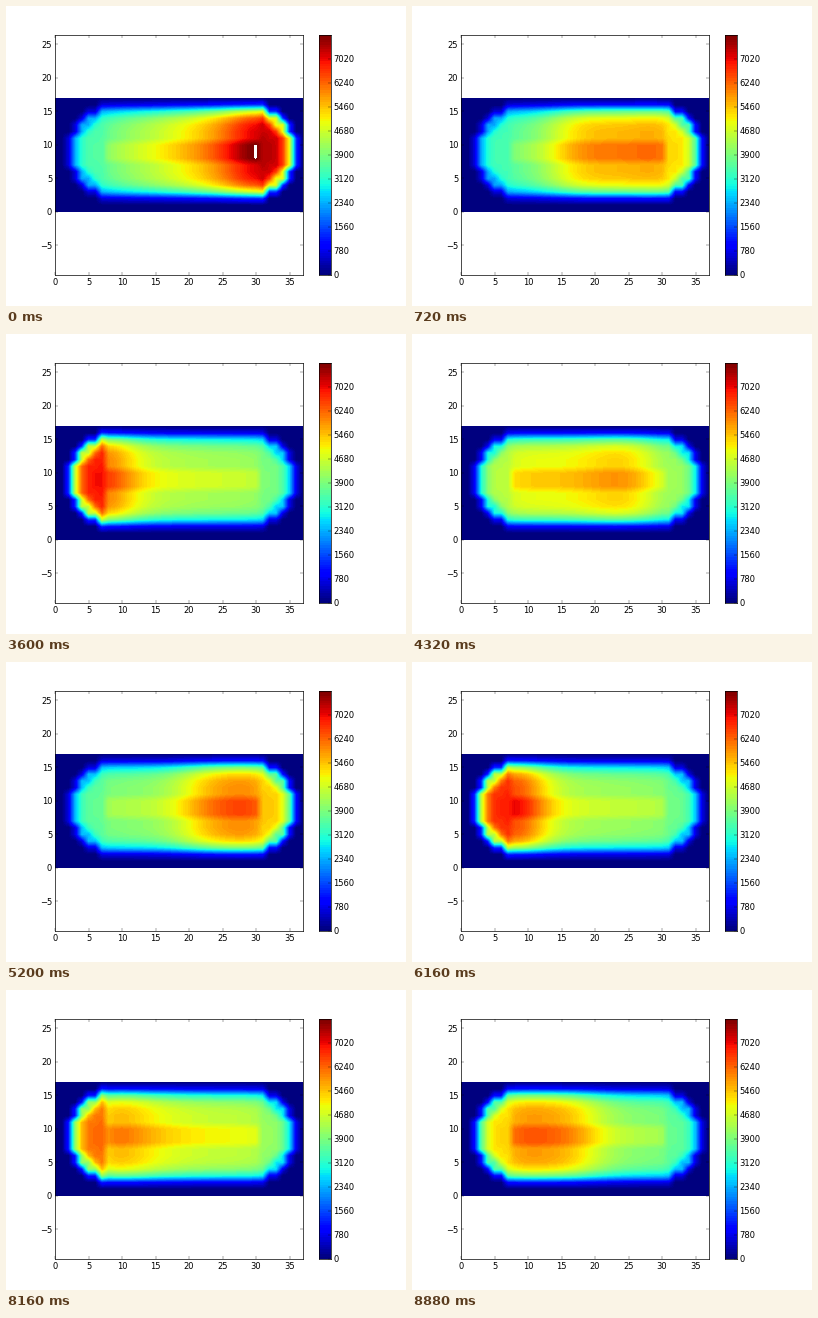
A matplotlib script that plays this animation: 400 by 300 pixels, repeating every 8.96 s.

```python
import numpy as np
import matplotlib
import matplotlib.pyplot as plt
from matplotlib.animation import FuncAnimation
from matplotlib.colors import ListedColormap

matplotlib.rcParams.update({
    "font.family": "DejaVu Sans",
    "font.size": 12,
    "axes.linewidth": 1.0,
    "axes.unicode_minus": True,
    "axes.axisbelow": False,
    "toolbar": "None",
})

FRAMES, STEP_MS = 112, 80
W, H = 37, 17                # size of the field
LEFT, RIGHT, AXIS = 8, 30, 9  # ends and height of the core
MID, SWING = 19, 13          # path of the heat spot
TOP = 7800                   # upper end of the colour scale
HALF = 15.2                  # frames per sweep
MEMORY = 6                   # decay of the trail, in frames
SPREAD = 3.5                 # width of the heat spot
SHARE = [1, 1, 0.91, 0.91, 0.89, 0.81, 0.60, 0.17, 0, 0]

xs, ys = np.arange(W + 1), np.arange(H + 1)
gx, gy = np.meshgrid(xs, ys)
track = np.clip(xs, LEFT, RIGHT)

# Cross profile of the capsule, stepped into whole rings
over = gx - np.clip(gx, LEFT + 1, RIGHT - 1)
ring = np.floor(np.hypot(over, gy - AXIS) + 0.5)
shape = np.interp(ring, np.arange(len(SHARE)), SHARE)

ago = np.arange(100)


def spot(n):
    lag = 2.5 - 3 * np.exp(-(np.maximum(n, 0) / 35) ** 2)
    return MID + SWING * np.cos(np.pi * (n + lag) / HALF)


def trail(n):
    d = track[:, None] - spot(n - ago)[None, :]
    return (np.exp(-0.5 * (d / SPREAD) ** 2) * np.exp(-ago / MEMORY)).sum(axis=1)


UNIT = trail(91)[RIGHT]


def calm(n):
    base = 4300 - 200 * ((track - MID) / 11) ** 2 - 400 * np.exp(-n / 20)
    return base + 2750 * trail(n) / UNIT


SURGE = TOP + 35 - calm(0)[RIGHT]


def end_gain(n, side):
    gap = SWING - side * (spot(n) - MID)
    return 0.95 + 0.22 * np.exp(-(gap / 4) ** 2) * (1 - 0.6 * np.exp(-n / 8))


def field(n):
    heat = calm(n) + SURGE * (track - 10) / 20 * np.exp(-n / 8)
    heat[:LEFT] *= end_gain(n, -1)
    heat[RIGHT + 1:] *= end_gain(n, 1)
    return heat[None, :] * shape


def weights(size, count):
    """Matrix for linear interpolation of size+1 nodes at count points."""
    p = (np.arange(count) + 0.5) * size / count
    return np.maximum(0, 1 - np.abs(p[:, None] - np.arange(size + 1)[None, :]))


wx, wy = weights(W, 744), weights(H, 342)


def fine(n):
    return wy @ field(n) @ wx.T


jet = ListedColormap(plt.get_cmap("jet")(np.linspace(0, 1, 100)))
jet.set_over("white")

fig = plt.figure(figsize=(8, 6), dpi=50, facecolor="white")
low = 0.1 + 1 / 300
ax = fig.add_axes([0.1225, low, 0.62, 0.8])
image = ax.imshow(fine(0), extent=(0, W, 0, H), origin="lower", cmap=jet,
                  vmin=0, vmax=TOP, interpolation="nearest", aspect="auto")
reach = W * 240 / 248 / 2
ax.set_xlim(0, W)
ax.set_ylim(H / 2 - reach, H / 2 + reach)
ax.set_xticks(range(0, 36, 5))
ax.set_yticks(range(-5, 26, 5))
ax.tick_params(direction="in", length=4, width=0.5, pad=4, top=True, right=True)

bar = fig.add_axes([0.78125, low, 0.03, 0.8])
scale = (np.arange(100)[:, None] + 0.5) * TOP / 100
bar.imshow(scale, extent=(0, 1, 0, TOP), origin="lower", cmap=jet,
           vmin=0, vmax=TOP, interpolation="nearest", aspect="auto")
bar.set_xticks([])
bar.set_yticks(range(0, 7021, 780))
bar.yaxis.tick_right()
bar.tick_params(direction="in", length=4, width=0.5, pad=4)


def update(n):
    image.set_data(fine(n))
    return [image]


anim = FuncAnimation(fig, update, frames=FRAMES, interval=STEP_MS,
                     init_func=lambda: update(0), repeat=True, blit=False)
plt.show()
```
